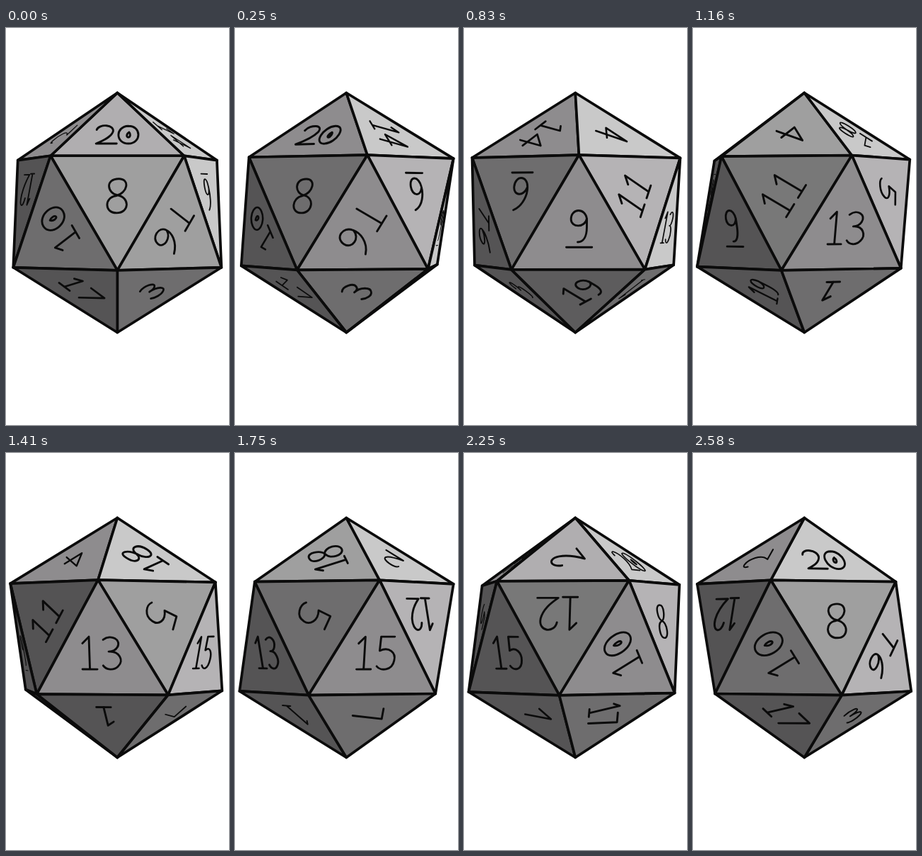
An HTML page for the animation above (2.66 s loop, 315x560 px).

```html
<!DOCTYPE html>
<html lang="en">
<head>
<meta charset="utf-8">
<title>Turning d20</title>
<style>
html, body { margin: 0; width: 100%; height: 100%; overflow: hidden; background: #fff; }
svg { display: block; width: 100%; height: 100%; }
.face { stroke: #0b0b0b; stroke-width: 3.7; stroke-linejoin: round; }
.mark { fill: none; stroke: #0b0b0b; stroke-linecap: round; stroke-linejoin: round; }
.mark path { vector-effect: non-scaling-stroke; }
</style>
</head>
<body>
<svg id="stage" viewBox="0 0 315 560"></svg>
<script>
const LOOP = 2660, FRAMES = 32;
const CX = 157.3, CY = 260.5, R = 169, DIST = 2100;
const RING = 2 * R / Math.sqrt(5), LEVEL = R / Math.sqrt(5);
const RAD = Math.PI / 180;

// Hand-lettered digits, centred on the origin, about 44 units tall.
const GLYPHS = {
  0: 'M0,-21C-18,-20 -18,21 0,21C18,20 18,-21 0,-21M1,-6C-3,-2 -3,6 0,6C3,5 3,-3 1,-6',
  1: 'M-9,-13L0,-22V22M-10,22H10',
  T: 'M-12,-19H12M0,-19V21',
  2: 'M-13,-12C-10,-27 12,-25 9,-7C6,6 -4,14 -14,21H14',
  3: 'M-11,-18C0,-26 14,-18 8,-8C5,-3 0,-2 -4,-2C10,-3 17,10 8,18C2,24 -8,23 -12,17',
  4: 'M5,-22V24M5,-22L-14,8H14',
  5: 'M11,-22H-8L-9,-3C4,-9 14,0 12,10C10,24 -6,25 -12,18',
  6: 'M8,-22C-8,-16 -13,0 -11,10C-9,25 11,26 11,10C11,-3 -7,-4 -11,9',
  7: 'M-13,-20H12L-3,22',
  8: 'M2,-23C-17,-23 -13,-3 0,-1C17,2 16,23 -1,23C-18,23 -17,2 -2,0C14,-4 17,-23 2,-23',
  9: 'M10,-9C8,-25 -11,-24 -11,-9C-11,3 8,3 10,-10V2C10,14 6,22 -2,22',
  _: 'M-17,29H17'
};

// Five faces per band: [label, turn, shift x, shift y, digit gap].
const BANDS = [
  { kind: 'top', start: 0, marks: [['20', 0, 0, 2], ['14', 110, 0, 0, 32], ['4', 120], ['18', -120, 2], ['2', -120, -1, -2]] },
  { kind: 'down', start: 0, marks: [['8', 0, 0, 3], ['6_', 180], ['11', -60, -3, -1], ['5', 112, 0, -4], ['12', 180, -4, -7]] },
  { kind: 'up', start: 36, marks: [['T6', 120, -3, -4, 38], ['9_', 0, 1, -8], ['13', 0, 0, -5], ['15', 0, 0, -5], ['10', -120, 0, -3, 33]] },
  { kind: 'base', start: 36, marks: [['3', -60], ['19', -44, 6, 0, 26], ['1', 180, -2], ['7', 82, 6, -2], ['17', 69, 0, -2]] }
];

// Tones by facing angle: [upper limit, grey].
const TONES = {
  top: [[-22, '#8e8c8e'], [-9.5, '#9f9f9f'], [10, '#b0aeb0'], [999, '#c9c9c9']],
  down: [[-45, '#545354'], [-13, '#6e6d6e'], [-5, '#787878'], [28, '#9f9f9f'], [68, '#b5b3b5'], [999, '#c9c9c9']],
  up: [[-40, '#555455'], [-10, '#6e6d6e'], [32, '#8e8c8e'], [45, '#9f9f9f'], [68, '#b5b3b5'], [999, '#c9c9c9']],
  base: [[-5, '#555455'], [5, '#5d5c5d'], [999, '#6e6d6e']]
};

// Uneven hand-paced turn: [drawing, degrees].
const PACE = [[0, 0], [3, 25.5], [10, 106.2], [14, 155.5], [21, 235.2], [27, 296], [31, 341], [32, 360]];

const polar = (deg, y) => [RING * Math.sin(deg * RAD), y, RING * Math.cos(deg * RAD)];
const TIP = [0, -R, 0], FOOT = [0, R, 0];
const CORNERS = {
  top: a => [TIP, polar(a + 36, -LEVEL), polar(a - 36, -LEVEL)],
  down: a => [polar(a - 36, -LEVEL), polar(a + 36, -LEVEL), polar(a, LEVEL)],
  up: a => [polar(a, -LEVEL), polar(a + 36, LEVEL), polar(a - 36, LEVEL)],
  base: a => [polar(a - 36, LEVEL), polar(a + 36, LEVEL), FOOT]
};
const EDGE = 2 * RING * Math.sin(36 * RAD);
const FLAT_AREA = Math.sqrt(3) / 2 * EDGE * EDGE; // twice the triangle, like the cross product below

function project([x, y, z]) {
  const k = DIST / (DIST - z);
  return [CX + x * k, CY + y * k];
}

function add(tag, parent, attrs) {
  const node = document.createElementNS('http://www.w3.org/2000/svg', tag);
  for (const key in attrs) node.setAttribute(key, attrs[key]);
  return parent.appendChild(node);
}

function letter(parent, [label, turn, dx = 0, dy = 0, gap = 30]) {
  const group = add('g', parent, { class: 'mark' });
  const spin = add('g', group, { transform: `translate(${dx} ${dy}) rotate(${turn})` });
  const digits = label.replace('_', '');
  [...digits].forEach((c, i) => {
    const x = (i - (digits.length - 1) / 2) * gap;
    add('path', spin, { d: GLYPHS[c], transform: `translate(${x} 0)` });
  });
  if (label !== digits) add('path', spin, { d: GLYPHS._ });
  return group;
}

const stage = document.getElementById('stage');
const faces = BANDS.flatMap(({ kind, start, marks }) => marks.map((mark, i) => {
  const box = add('g', stage, {});
  return {
    kind, box, angle: start + 72 * i,
    shape: add('polygon', box, { class: 'face' }),
    mark: letter(box, mark)
  };
}));

function turnAt(n) {
  const i = PACE.findIndex(p => p[0] > n);
  const [n0, a0] = PACE[i - 1], [n1, a1] = PACE[i];
  return a0 + (a1 - a0) * (n - n0) / (n1 - n0);
}

// Maps flat face units (u sideways, v down the face) to the screen.
function faceMatrix(points, facing) {
  const mid = [0, 1, 2].map(k => (points[0][k] + points[1][k] + points[2][k]) / 3);
  const u = [Math.cos(facing * RAD), 0, -Math.sin(facing * RAD)];
  const lone = Math.abs(points[0][1] - points[1][1]) < 1 ? 2 : 0;
  const sign = lone === 2 ? 1 : -1;
  const arm = points[lone].map((c, k) => sign * (c - mid[k]));
  const len = Math.hypot(...arm);
  const v = arm.map(c => c / len);
  const o = project(mid);
  const axis = dir => {
    const p = project(mid.map((c, k) => c + dir[k] * 10));
    return [(p[0] - o[0]) / 10, (p[1] - o[1]) / 10];
  };
  return [...axis(u), ...axis(v), ...o].map(n => n.toFixed(4)).join(' ');
}

function draw(turn) {
  for (const f of faces) {
    const facing = ((f.angle - turn + 540) % 360 + 360) % 360 - 180;
    const points = CORNERS[f.kind](facing);
    const [a, b, c] = points.map(project);
    const area = (b[0] - a[0]) * (c[1] - a[1]) - (b[1] - a[1]) * (c[0] - a[0]);
    const seen = area > 0;
    f.box.setAttribute('display', seen ? 'inline' : 'none');
    if (!seen) continue;
    f.shape.setAttribute('points', [a, b, c].map(p => p.map(n => n.toFixed(2)).join()).join(' '));
    f.shape.setAttribute('fill', TONES[f.kind].find(t => facing < t[0])[1]);
    f.mark.setAttribute('transform', `matrix(${faceMatrix(points, facing)})`);
    // Lettering thins out on faces seen edge-on.
    f.mark.setAttribute('stroke-width', Math.min(2.9, 0.8 + 4 * area / FLAT_AREA).toFixed(2));
  }
}

// Twelve drawings a second, on 10 ms ticks.
const startOf = n => 10 * Math.floor(n * 25 / 3);
function drawingAt(ms) {
  let n = 0;
  while (n < FRAMES - 1 && startOf(n + 1) <= ms) n++;
  return n;
}

const begin = performance.now();
let shown = -1;
function tick() {
  const n = drawingAt((performance.now() - begin) % LOOP);
  if (n !== shown) draw(turnAt(shown = n));
  requestAnimationFrame(tick);
}
tick();
</script>
</body>
</html>
```
